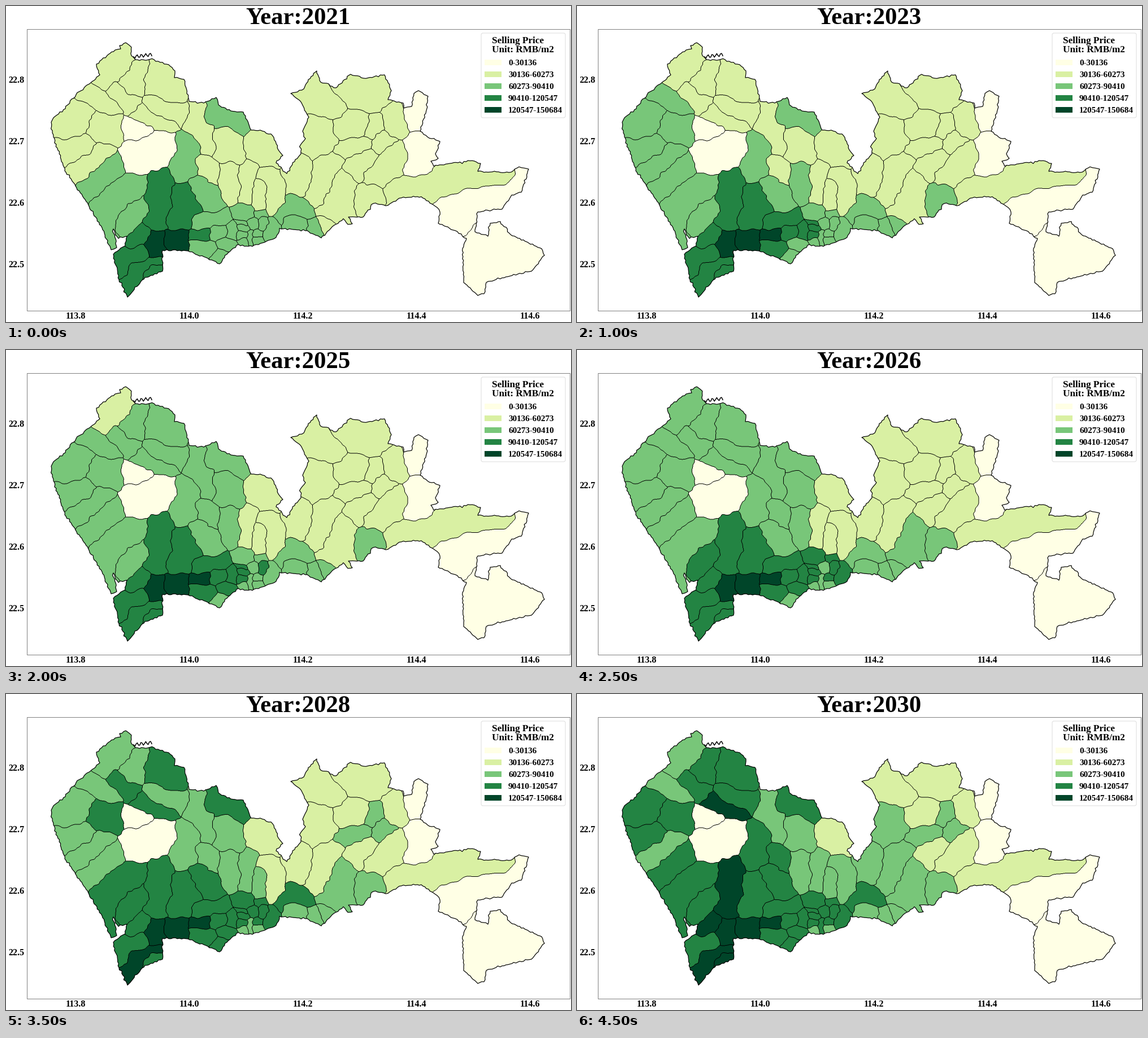
These frames come from a looping animation (1000 px wide and 560 px high, 5000 ms). A matplotlib script:

```python
import numpy as np
import matplotlib.pyplot as plt
from matplotlib.animation import FuncAnimation
from matplotlib.colors import to_rgb
from matplotlib.patches import FancyBboxPatch, Polygon, Rectangle

W, H, DPI = 1000, 560, 100
PT = 72 / DPI
SS = 2  # subpixels per pixel along each side
X0, X1, Y0, Y1 = 76, 960, 60, 520  # part of the stage that holds the map
COLORS = ["#ffffe5", "#d9f0a3", "#78c679", "#238443", "#004529"]
FIRST_YEAR, YEARS = 2021, 10

rng = np.random.default_rng(8)
districts = []


def district(level, rises, width, *spine):
    """A band of half-width `width` around a spine; it climbs one level in each year of rises."""
    districts.append((level, rises, width, np.array(spine, np.float32)))


# north-west
district(1, [2026], 20, (175, 122), (208, 92))
district(1, [2024, 2028], 27, (272, 125), (294, 145))
district(1, [2024, 2030], 16, (238, 112), (220, 142))
district(1, [2023], 13, (138, 153), (185, 178))
district(1, [2025, 2028], 12, (195, 152), (222, 176))
district(1, [2022, 2030], 27, (108, 205), (128, 198))
district(1, [2022, 2029], 15, (100, 258), (140, 245))
district(1, [2022], 12, (125, 300), (175, 252))
district(2, [2029], 14, (138, 330), (195, 280))
district(1, [2022, 2027], 24, (165, 215), (183, 220))
district(1, [2024, 2029], 14, (265, 178), (312, 188))
district(1, [2024, 2028, 2029], 10, (234, 190), (285, 213))
district(0, [], 14, (218, 218), (240, 220))
district(0, [], 26, (232, 268), (275, 250))

# south-west
district(2, [2027], 18, (228, 318), (172, 355), (180, 408))
district(2, [2026], 16, (207, 392), (238, 362))
district(3, [2029], 13, (240, 402), (228, 416))
district(3, [], 12, (200, 465), (212, 445), (240, 437))
district(3, [2027], 7, (270, 452), (230, 465), (212, 500))
district(3, [2029], 7, (256, 468), (268, 465))
district(3, [2030], 20, (275, 315), (266, 378))
district(4, [], 15, (267, 415), (264, 432))
district(4, [], 19, (298, 415), (304, 415))
district(3, [], 20, (312, 335), (322, 352), (303, 380))

# centre
district(1, [2024], 15, (338, 185), (338, 212), (358, 245))
district(2, [2028], 18, (368, 188), (415, 208))
district(1, [2024], 25, (392, 240), (397, 257))
district(2, [2030], 20, (322, 248), (315, 290))
district(1, [2024, 2029], 14, (350, 280), (366, 298))
district(1, [2023], 16, (393, 290), (400, 335))
district(2, [2028], 18, (342, 320), (368, 348))
district(1, [2028], 13, (427, 292), (424, 340))
district(1, [2028], 12, (447, 322), (447, 352))
district(1, [2030], 13, (462, 298), (480, 325), (472, 355))
district(1, [], 22, (442, 245), (462, 262))
district(1, [2030], 20, (517, 288), (518, 318))

# north-east
district(1, [], 30, (612, 150), (650, 155))
district(1, [], 22, (535, 155), (555, 168), (580, 180))
district(1, [], 22, (600, 212), (620, 206))
district(1, [2029], 30, (553, 225), (553, 235))
district(1, [], 16, (683, 190), (692, 210))
district(0, [], 16, (728, 175), (722, 198))
district(1, [2028], 12, (655, 205), (647, 220))
district(1, [2028], 11, (595, 252), (635, 245))
district(1, [2028], 14, (662, 243), (668, 240))

# east
district(1, [2030], 18, (570, 280), (548, 340))
district(1, [2026], 18, (598, 312), (590, 345), (568, 358))
district(1, [], 17, (620, 290), (640, 274))
district(1, [], 22, (690, 270), (655, 300))
district(0, [], 22, (735, 250), (728, 280))
district(1, [2022], 17, (638, 335), (650, 333))
district(1, [], 18, (690, 330), (740, 318), (820, 298), (890, 305))
district(0, [], 16, (800, 385), (790, 360), (840, 342), (890, 322), (918, 295))
district(0, [], 45, (865, 440), (840, 450))
district(2, [2028], 12, (488, 372), (512, 345), (532, 362))
district(2, [], 11, (500, 382), (520, 387))
district(2, [], 8, (540, 388), (552, 398))
district(1, [2023], 8, (562, 380), (566, 393))

# inner city
district(2, [2022], 12, (342, 383), (390, 372))
district(3, [2022], 10, (335, 408), (352, 405))
district(2, [2022], 13, (338, 427), (358, 432))
district(2, [2022], 12, (372, 402), (380, 400))
district(2, [2022], 9, (400, 393), (400, 403))
district(2, [2022], 5, (412, 383), (422, 383))
district(2, [2022], 6, (416, 394), (423, 394))
district(2, [2022], 5, (414, 407), (424, 407))
district(2, [2027], 12, (376, 445), (378, 442))
district(2, [2025], 9, (384, 422), (398, 422))
district(2, [2026], 13, (410, 364), (428, 366))
district(2, [2026], 8, (447, 367), (456, 369))
district(2, [2027], 9, (437, 383), (438, 387))
district(2, [2024], 7, (458, 380), (453, 390))
district(2, [2026], 10, (473, 385), (466, 403))
district(2, [2029], 5, (433, 401), (433, 414))
district(2, [2026], 7, (446, 402), (447, 403))
district(2, [], 6, (442, 416), (448, 414))
district(2, [], 5, (414, 417), (422, 416))

# key points of the coast, clockwise
NORTH_WEST = [
    (80, 206), (84, 198), (105, 182), (116, 165), (133, 150), (150, 136), (166, 122),
    (160, 103), (172, 92), (193, 78), (203, 76), (201, 70), (212, 65), (222, 73),
    (222, 88), (229, 95), (262, 95), (288, 104), (299, 115), (298, 127), (315, 130),
    (324, 169), (350, 172), (372, 162), (376, 175), (398, 186), (420, 188), (434, 220),
    (450, 220), (472, 230), (482, 255), (490, 265), (478, 278), (497, 297)]
NORTH_EAST = [
    (512, 272), (522, 262), (522, 245), (530, 235), (525, 222), (536, 197), (518, 166),
    (504, 155), (527, 147), (540, 125), (550, 115), (557, 135), (584, 145), (610, 121),
    (633, 128), (670, 122), (682, 150), (676, 166), (703, 172), (704, 181), (718, 178),
    (722, 155), (730, 150), (747, 160), (743, 190), (733, 222), (746, 232), (768, 240),
    (760, 262), (765, 270), (752, 275), (757, 284), (825, 274), (840, 279), (835, 293),
    (890, 295), (908, 285), (925, 289)]
SOUTH_EAST = [
    (912, 330), (895, 335), (878, 360), (835, 365), (830, 400), (853, 408), (857, 385),
    (875, 382), (893, 405), (948, 430), (953, 442), (930, 470), (885, 480), (850, 490),
    (846, 510), (835, 513), (810, 490), (808, 430), (815, 412), (795, 398), (765, 385),
    (768, 365), (763, 357), (735, 338), (700, 340), (672, 354), (650, 350), (632, 374),
    (606, 374), (613, 386), (605, 387), (597, 377), (580, 389), (558, 411)]
SOUTH_WEST = [
    (533, 398), (484, 394), (478, 410), (436, 426), (408, 424), (391, 440), (378, 457),
    (364, 450), (322, 434), (277, 433), (277, 470), (246, 481), (225, 505), (215, 516),
    (200, 485), (190, 440), (203, 429), (211, 425), (214, 408), (199, 412), (190, 395),
    (196, 428), (186, 432), (170, 393), (140, 343), (104, 292), (84, 232)]


def roughen(points, step=3.5, amount=0.8):
    """Split edges into short pieces with a small sideways wobble."""
    pts = np.array(points, float)
    out = []
    for p, q in zip(pts, np.roll(pts, -1, axis=0)):
        d = q - p
        length = np.hypot(*d)
        normal = np.array([-d[1], d[0]]) / length
        n = max(1, int(length / step))
        out.append(p)
        out += [p + d * k / n + normal * rng.normal(0, amount) for k in range(1, n)]
    return out


def ripple(x, y, waves=6):
    """Smooth seeded noise that makes straight borders meander."""
    total = 0
    for wavelength in np.geomspace(9, 36, waves):
        angle, phase = rng.uniform(0, 2 * np.pi, 2)
        along = x * np.cos(angle) + y * np.sin(angle)
        total = total + 0.035 * wavelength * np.sin(2 * np.pi * along / wavelength + phase)
    return total.astype(np.float32)


def spine_distance(x, y, spine):
    best = np.inf
    for (ax_, ay), (bx, by) in zip(spine, spine[1:]):
        dx, dy = bx - ax_, by - ay
        t = np.clip(((x - ax_) * dx + (y - ay) * dy) / (dx * dx + dy * dy), 0, 1)
        best = np.minimum(best, (x - ax_ - t * dx) ** 2 + (y - ay - t * dy) ** 2)
    return np.sqrt(best)


def partition():
    """Give every subpixel to its closest district and mark the borders."""
    x, y = np.meshgrid(np.arange(X0, X1, 1 / SS, dtype=np.float32) + 0.5 / SS,
                       np.arange(Y0, Y1, 1 / SS, dtype=np.float32) + 0.5 / SS)
    x, y = x + ripple(x, y), y + ripple(x, y)
    nearest = np.full(x.shape, np.inf, np.float32)
    owner = np.zeros(x.shape, int)
    for k, (_, _, width, spine) in enumerate(districts):
        gap = spine_distance(x, y, spine) - width
        closer = gap < nearest
        nearest[closer] = gap[closer]
        owner[closer] = k
    border = np.zeros(x.shape, bool)
    across = owner[:, 1:] != owner[:, :-1]
    down = owner[1:] != owner[:-1]
    border[:, 1:] |= across
    border[:, :-1] |= across
    border[1:] |= down
    border[:-1] |= down
    return owner, border


fig = plt.figure(figsize=(W / DPI, H / DPI), dpi=DPI, facecolor="white")
ax = fig.add_axes([0, 0, 1, 1])
owner, border = partition()
palette = np.array([to_rgb(c) for c in COLORS])


def paint(year):
    levels = [level + sum(year >= r for r in rises) for level, rises, _, _ in districts]
    rgb = palette[levels][owner]
    rgb[border] = 0
    h, w = owner.shape
    return rgb.reshape(h // SS, SS, w // SS, SS, 3).mean(axis=(1, 3))


coast = roughen(NORTH_WEST + NORTH_EAST + SOUTH_EAST + SOUTH_WEST)
land = Polygon(coast, closed=True, fill=False, ec="black", lw=1.2 * PT,
               joinstyle="round", zorder=3)
fill = ax.imshow(paint(FIRST_YEAR), extent=(X0, X1, Y1, Y0), aspect="auto",
                 interpolation="nearest", zorder=2)
ax.set_xlim(0, W)
ax.set_ylim(H, 0)
ax.axis("off")
ax.add_patch(land)
fill.set_clip_path(land)

# thin headland on the north coast
s = np.linspace(0, 1, 16)
ax.plot(226 + 32 * s, 90 - 4 * s + 3 * np.sin(26 * s), color="black", lw=1.5 * PT)


def label(x, y, text, px, ha="left"):
    return ax.text(x, y, text, fontsize=px * PT, family="Liberation Serif",
                   weight="bold", ha=ha, va="baseline", zorder=9)


# frame, ticks and legend
ax.add_patch(Rectangle((36.5, 40.5), 961, 499, fill=False, ec="#808080", lw=PT))
for k in range(5):
    label(123 + 201 * k, 554, f"{113.8 + 0.2 * k:.1f}", 16, "center")
for k in range(4):
    label(32.5, 136.5 + 108.7 * k, f"{22.8 - 0.1 * k:.1f}", 16, "right")

ax.add_patch(FancyBboxPatch((844, 51), 143, 144, boxstyle="round,pad=3,rounding_size=3",
                            fc="white", ec="#dcdcdc", lw=PT, zorder=8))
label(860, 66, "Selling Price", 17.1)
label(860, 82.5, "Unit: RMB/m2", 17.1)
ranges = ["0-30136", "30136-60273", "60273-90410", "90410-120547", "120547-150684"]
for k, (text, color) in enumerate(zip(ranges, COLORS)):
    y = 100 + 21 * k
    ax.add_patch(Rectangle((847, y - 5), 30, 10, fc=color, ec="none", zorder=9))
    label(889, y + 5, text, 15.1)

title = label(517, 32, "", 42.8, "center")


def update(i):
    year = FIRST_YEAR + i
    title.set_text(f"Year:{year}")
    fill.set_data(paint(year))
    return [title, fill]


anim = FuncAnimation(fig, update, frames=YEARS, interval=500, repeat=True, blit=False)
plt.show()
```
